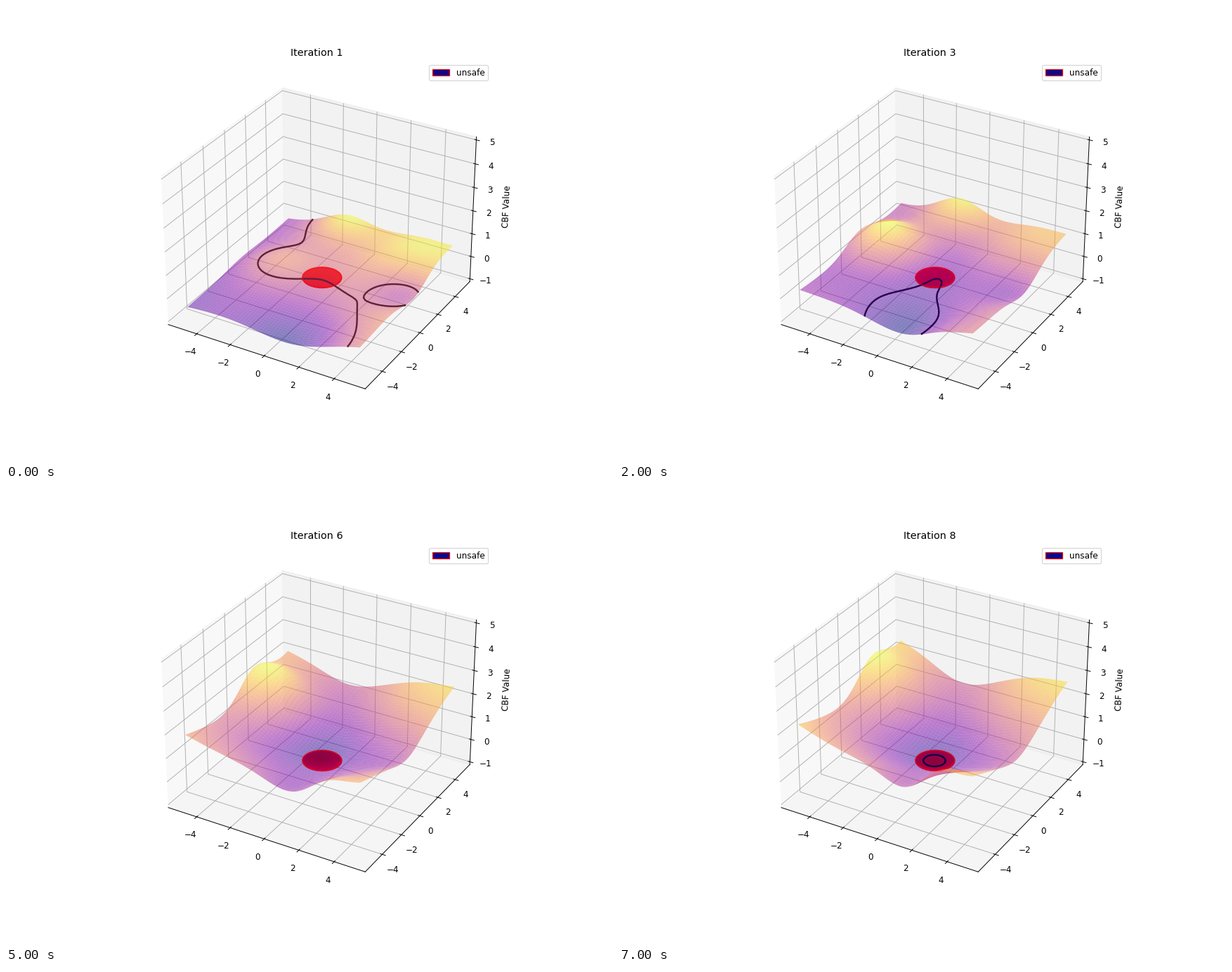
Recreate the animation shown at these times as a matplotlib script. Size 864 by 648 pixels, loop 8000 ms.

```python
import numpy as np
import matplotlib.pyplot as plt
from matplotlib.animation import FuncAnimation
from matplotlib.patches import Patch
from mpl_toolkits.mplot3d.art3d import Poly3DCollection

STEPS = 8
SIDE = 5             # half width of the surface
MARGIN = 25 / 24     # space between the axis limits and the panes
plasma = plt.get_cmap("plasma")

fig = plt.figure(figsize=(10, 7.5), dpi=86.4)
ax = fig.add_subplot(projection="3d", computed_zorder=False)
reach = 1.1 * SIDE * MARGIN
ax.set(xlim=(-reach, reach), ylim=(-reach, reach),
       zlim=(2 - 3 * MARGIN, 2 + 3 * MARGIN), zlabel="CBF Value")
ax.set_xticks(range(-4, 5, 2))
ax.set_yticks(range(-4, 5, 2))
title = ax.set_title("Iteration 1")
ax.legend(handles=[Patch(facecolor=plasma(0), edgecolor="red", label="unsafe")],
          loc="upper right")

grid = np.linspace(-SIDE, SIDE, 61)
X, Y = np.meshgrid(grid, grid)


def hill(x, y, width):
    return np.exp(-((X - x) ** 2 + (Y - y) ** 2) / width ** 2)


def keyed(step, *values):
    """Value at a step, from keys at steps 1, 3, 4, 6 and 8."""
    return np.interp(step, (1, 3, 4, 6, 8), values)


def landscape(step):
    """A tilted plane with hills that turns into a cone around the disc."""
    p = (step - 1) / (STEPS - 1)

    def ramp(a, b):
        return a + (b - a) * p

    cone = 0.37 * np.sqrt(X ** 2 + Y ** 2 + 0.16)
    z = keyed(step, -0.02, -0.12, 0.03, -0.07, -0.28)
    z = z + keyed(step, 0, 0.27, 0.44, 0.8, 1) * cone
    z += ramp(1, 0) * (0.073 * X + 0.017 * Y)

    # left peak, back peak, back right plateau, front right ridge
    z += keyed(step, 0.4, 1.35, 1.5, 1.5, 1.2) * hill(ramp(-2.7, -4.3), ramp(0.2, 2), 2)
    z += keyed(step, 0.65, 0.95, 0.6, -0.25, -0.35) * hill(-1.3, 5, 1.9)
    z += ramp(0.33, 0.6) * hill(3, 4, 2.6)
    z += ramp(0, 0.45) * hill(3, -4.7, 1.3)

    # front trough and right pocket
    z -= 0.62 * hill(1.2, -5, ramp(3, 1.6))
    z -= ramp(0.5, 0.3) * hill(4.4, ramp(0.7, -0.6), 1.8)
    return z


# The unsafe disc lies under the translucent surface, its rim shows through.
turn = np.linspace(0, 2 * np.pi, 73)
ring = np.column_stack([np.cos(turn), np.sin(turn), 0 * turn])
ax.add_collection3d(Poly3DCollection([ring], facecolor="red", edgecolor="red",
                                     linewidth=1.5, zorder=1))
ax.plot(*ring.T, color="red", lw=1.5, alpha=0.5, zorder=4)

shown = []


def update(i):
    while shown:
        shown.pop().remove()
    z = landscape(i + 1)
    if z.min() < 0:
        shown.append(ax.contour(X, Y, z, levels=[0], colors="black",
                                linewidths=2, zorder=2))
    shown.append(ax.plot_surface(X, Y, z, cmap="plasma", alpha=0.5,
                                 rcount=61, ccount=61, linewidth=0, zorder=3))
    title.set_text(f"Iteration {i + 1}")
    return shown


anim = FuncAnimation(fig, update, frames=STEPS, interval=1000, repeat=True)
plt.show()
```
